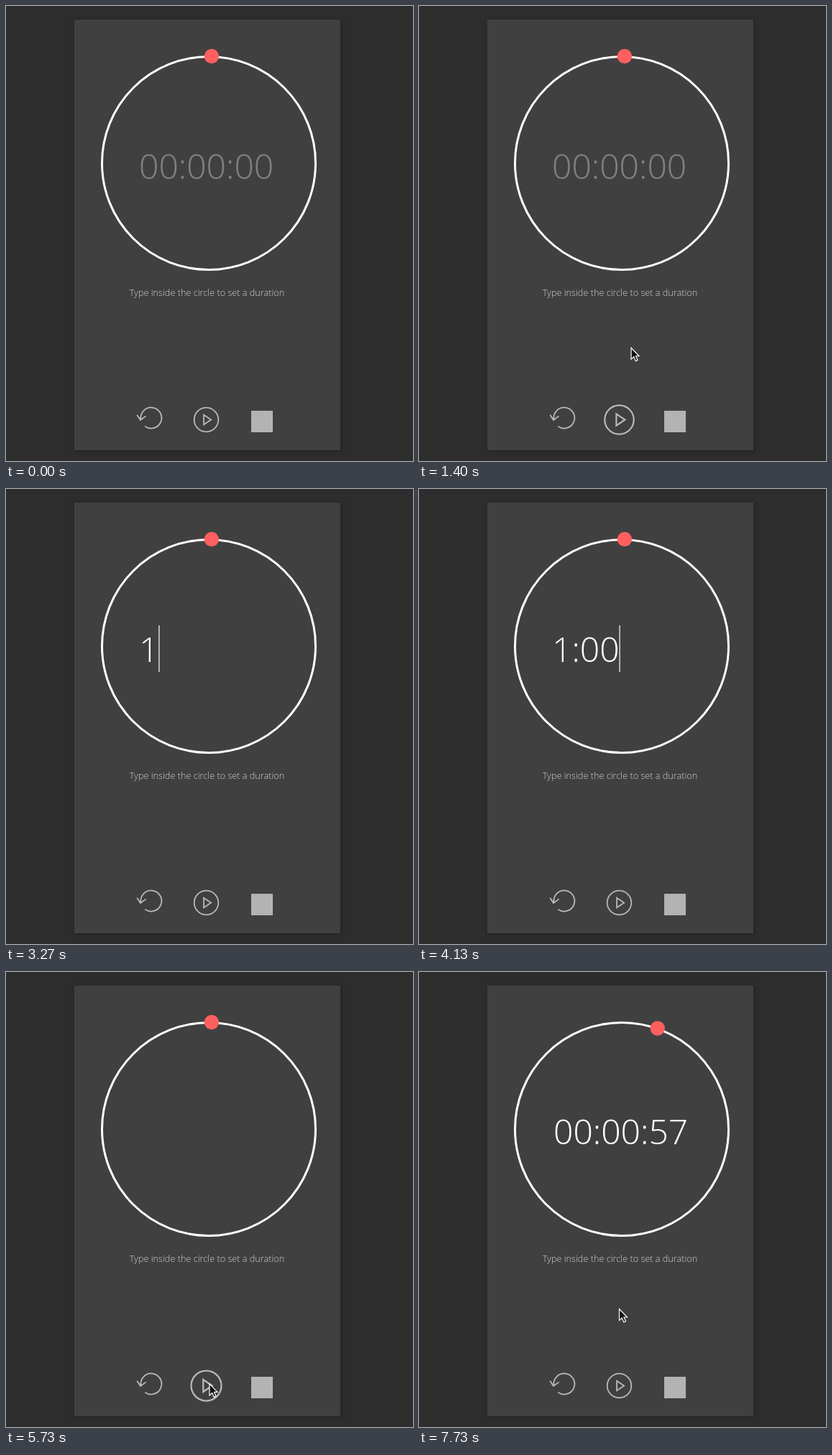
Recreate the animation shown at these times as an HTML page. Size 566 by 634 pixels, loop 8 s.

```html
<!DOCTYPE html>
<html lang="en">
<head>
<meta charset="utf-8">
<title>Countdown timer</title>
<style>
  html, body { margin: 0; width: 100%; height: 100%; overflow: hidden; background: #2d2d2d; }
  svg { display: block; width: 566px; height: 634px; font-family: "Open Sans", sans-serif; font-weight: 300; }
  .panel { fill: #404040; filter: drop-shadow(1px 1px 2px rgba(0, 0, 0, .3)); }
  .icon { fill: none; stroke: #b9b9b9; stroke-width: 1.8; }
  #clock { font-size: 48px; }
  #label { font-size: 12.7px; fill: #cfcfcf; text-anchor: middle; }
</style>
</head>
<body>
<svg viewBox="0 0 566 634">
  <rect class="panel" x="95" y="19" width="370" height="600"/>
  <circle cx="282" cy="219" r="148.5" fill="none" stroke="#fff" stroke-width="3"/>
  <circle id="dot" r="10.2" fill="#ff5f5f"/>
  <text id="clock"></text>
  <path id="caret" d="M213.5 190V255" stroke="#fff" stroke-width="1.2"/>
  <text id="label" x="279.5" y="404">Type inside the circle to set a duration</text>
  <path class="icon" d="M187.5 576A14.5 14.5 0 1 1 193.2 585.6M182.3 569.8L187 577L194.6 571.4"/>
  <g id="play" class="icon">
    <circle r="16.8"/>
    <path d="M-3.4 -6.8L6.6 0L-3.4 6.8Z"/>
  </g>
  <rect x="341" y="564" width="30" height="30" fill="#b3b3b3"/>
  <path id="arrow" d="M0 0V16L3.7 12.6L6.3 18.4L9 17.2L6.5 11.5H11Z" fill="#111" stroke="#fff" stroke-width="1.2"/>
  <path id="beam" d="M-3 -8Q0 -8 0 -6Q0 -8 3 -8M0 -6V6M-3 8Q0 8 0 6Q0 8 3 8" fill="none" stroke="#ddd"/>
</svg>
<script>
const LOOP = 8000;
const el = id => document.getElementById(id);
const dot = el('dot'), clock = el('clock'), caret = el('caret');
const play = el('play'), arrow = el('arrow'), beam = el('beam');

// Pointer stops: time, x, y
const pointerPath = [
  [70, 369, 597], [270, 368, 577], [400, 378, 574], [650, 420, 558], [1000, 296, 571],
  [1200, 286, 575], [1320, 290, 553], [1400, 295, 477], [1730, 307, 228], [1930, 326, 222],
  [2200, 312, 222], [4400, 306, 222], [4600, 296, 400], [4800, 280, 565], [5060, 283, 572],
  [5530, 283, 573], [5740, 283, 574], [5820, 282, 550], [6100, 278.5, 469.5]
];
const typing = [[3150, '1'], [3520, '1:'], [3780, '1:0'], [3960, '1:00']];
const CLEARED = 5120, FIRST_TICK = 5760, NEXT_TICK = 6980;

const clamp = v => Math.min(1, Math.max(0, v));
const within = (t, a, b) => t >= a && t < b;
const show = (node, on) => node.setAttribute('visibility', on ? 'visible' : 'hidden');
const move = (node, x, y, extra = '') => node.setAttribute('transform', `translate(${x} ${y})${extra}`);

// cubic-bezier(.25, .1, .25, 1)
function ease(p) {
  p = clamp(p);
  const curve = (u, a, b) => 3 * u * (1 - u) ** 2 * a + 3 * u * u * (1 - u) * b + u ** 3;
  let low = 0, high = 1;
  for (let i = 0; i < 20; i++) {
    const mid = (low + high) / 2;
    if (curve(mid, .25, .25) < p) low = mid; else high = mid;
  }
  return curve(low, .1, 1);
}

function pointerAt(t) {
  const i = pointerPath.findIndex(stop => stop[0] > t);
  if (i < 1) return (i ? pointerPath.at(-1) : pointerPath[0]).slice(1);
  const [t0, x0, y0] = pointerPath[i - 1], [t1, x1, y1] = pointerPath[i];
  const p = (t - t0) / (t1 - t0);
  return [x0 + (x1 - x0) * p, y0 + (y1 - y0) * p];
}

function setClock(text, color, x, y) {
  clock.textContent = text;
  clock.setAttribute('fill', color);
  clock.setAttribute('x', x);
  clock.setAttribute('y', y);
}

function drawClock(t) {
  const typed = typing.filter(([start]) => t >= start).at(-1)?.[1] ?? '';
  if (t >= FIRST_TICK) setClock(t < NEXT_TICK ? '00:00:58' : '00:00:57', '#fff', 187, 240.3);
  else if (t >= CLEARED) setClock('', '#fff', 185, 241.3);
  else if (typed) setClock(typed, '#fff', 185, 241.3);
  else setClock('00:00:00', '#808080', 185, 241.3);

  const width = typed ? clock.getComputedTextLength() : 0;
  move(caret, width - 28, 0);
  show(caret, within(t, 2300, 2840) || within(t, 3150, 4480));
}

function drawDot(t) {
  const degrees = 1.5 + 12 * ease((t - FIRST_TICK) / 500) + 6 * ease((t - NEXT_TICK) / 500);
  const angle = degrees * Math.PI / 180;
  move(dot, 282 + 149 * Math.sin(angle), 219 - 149 * Math.cos(angle));
}

function drawPointer(t) {
  const [x, y] = pointerAt(t);
  const visible = within(t, 70, 2900) || t >= 4400;
  const overInput = within(y, 190, 255);
  move(arrow, x, y);
  move(beam, x, y);
  show(arrow, visible && !overInput);
  show(beam, visible && overInput);
}

function drawPlay(t) {
  const fade = start => ease((t - start) / 400);
  const hover = fade(1000) - fade(1340) + fade(4830) - fade(5790);
  move(play, 278.5, 576.5, ` scale(${1 + .25 * hover})`);
}

function frame(now) {
  const t = now % LOOP;
  drawClock(t);
  drawDot(t);
  drawPointer(t);
  drawPlay(t);
  requestAnimationFrame(frame);
}
requestAnimationFrame(frame);
</script>
</body>
</html>
```
